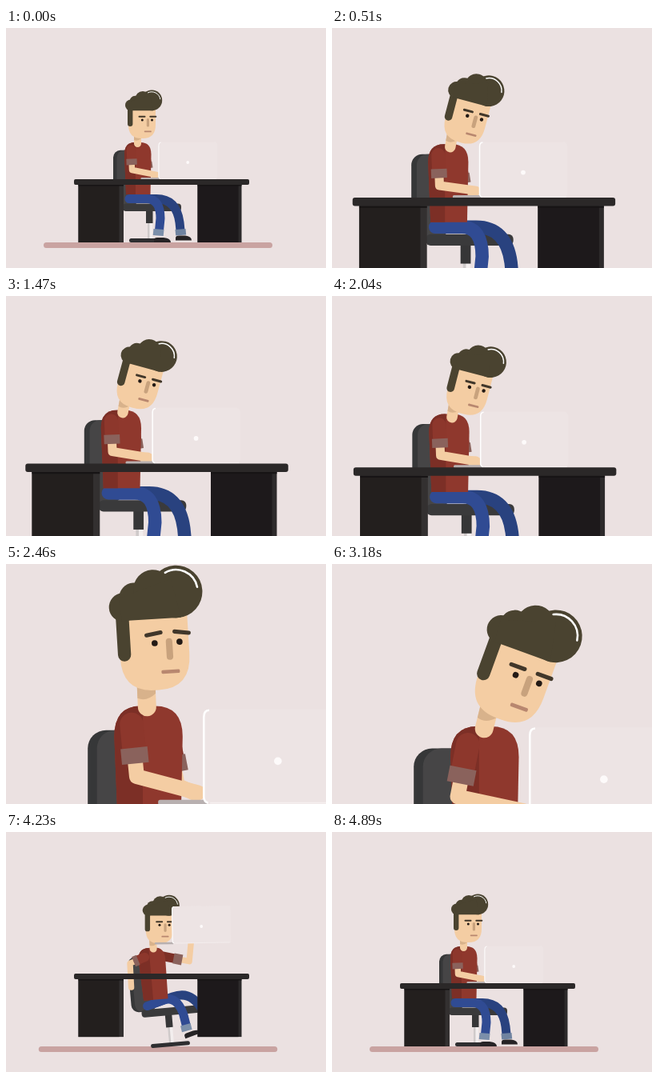
An HTML page for the animation above (4.92 s loop, 400x300 px).

```html
<!DOCTYPE html>
<html lang="en">
<head>
<meta charset="utf-8">
<title>Desk worker</title>
<style>
html, body { margin: 0; width: 100%; height: 100%; overflow: hidden; background: #ebe1e1; }
svg { display: block; width: 100vw; height: 100vh; }
</style>
</head>
<body>
<svg viewBox="0 0 400 300">
  <rect width="400" height="300" fill="#ebe1e1"/>
  <g id="world">
    <rect id="ground" y="268" height="7" rx="3.5" fill="#c9a3a1"/>
    <g id="man">
      <g id="chair">
        <rect x="177" y="242" width="6" height="22" fill="#f3eeee"/>
        <rect x="177" y="242" width="2.5" height="22" fill="#cfcaca"/>
        <rect x="175" y="228" width="8.5" height="16" fill="#363637"/>
        <rect x="154" y="263" width="49" height="5" rx="2.5" fill="#2e2e30"/>
        <rect x="134" y="152.800" width="30" height="69" rx="9" fill="#363738"/>
        <rect x="138.500" y="152.800" width="27" height="69" rx="9" fill="#464546"/>
        <rect x="146" y="219.500" width="73" height="9.500" rx="4" fill="#3a3a3b"/>
      </g>
      <g id="legs" fill="none" stroke-width="11">
        <path d="M212 265.500v-3q0-3 4-3h8q8 1 8 6z" fill="#262325"/>
        <path d="M160 213.500H188Q213 213.500 217 243L218 253" stroke="#29427f"/>
        <path d="M211.500 252l13-1 .7 7.500-13 1z" fill="#6f83a0"/>
        <path d="M185 268v-3q0-3 4-3h8q9 1 9 6z" fill="#262325"/>
        <path d="M154 213.500H176Q193 213.500 193 238L191.500 253" stroke="#304b93" stroke-linecap="round"/>
        <path d="M184.500 251l13 1-.8 8-13-1z" fill="#7b8faa"/>
      </g>
      <g id="torso">
        <g id="farArm"></g>
        <path d="M148 158Q148 143 161 143H168Q181.500 143 181.500 158L180.500 208H150Z" fill="#8f382d"/>
        <path d="M148 158Q148 143 161 143H162V208H150Z" fill="#7c2f26"/>
        <g id="neck">
          <rect x="160" y="128" width="9" height="21" rx="4.500" fill="#f4cda3"/>
          <path d="M160 130h9v8q-4.500 4-9 2z" fill="#d8b28b"/>
        </g>
        <g id="head">
          <path d="M153 96H187V121Q187 138 171 138H169Q153 138 153 121Z" fill="#f4cda3"/>
          <rect x="152" y="96" width="6.400" height="27" rx="3.200" fill="#4a4330"/>
          <g fill="#4a4330">
            <circle cx="182.300" cy="90.400" r="12.900"/>
            <circle cx="156" cy="96.500" r="7"/>
            <circle cx="161.500" cy="92" r="7.200"/>
            <circle cx="171" cy="88.500" r="9.500"/>
            <path d="M154 92L180 84 184 103.200 155 103.200Z"/>
          </g>
          <path d="M177.500 80.800A10.600 10.600 0 0 1 192.800 88.800" fill="none" stroke="#fff" stroke-width="1" stroke-linecap="round"/>
          <g fill="#231a15">
            <circle cx="170.300" cy="115" r="1.500"/>
            <circle cx="182.500" cy="115" r="1.500"/>
          </g>
          <g fill="#41372a">
            <rect id="browL" x="165.500" y="109.800" width="9" height="2" rx="1"/>
            <rect id="browR" x="179.300" y="109.800" width="9" height="2" rx="1"/>
          </g>
          <rect x="175.800" y="113" width="3.200" height="10.600" rx="1.600" fill="#c8a27d"/>
          <rect x="172.800" y="128.400" width="9" height="1.800" rx=".6" fill="#b8876f"/>
        </g>
        <g id="nearArm"></g>
      </g>
    </g>
    <g id="laptop">
      <rect x="168.500" y="187" width="24" height="2.500" rx="1" fill="#b8b0b0"/>
      <rect x="190.500" y="142.500" width="73.500" height="46.500" rx="3.500" fill="#ede4e4"/>
      <path d="M263 188.500H194" stroke="#f6f0f0" stroke-width=".7"/>
      <path d="M193.500 143Q190.900 143 190.900 146.500V185.500Q190.900 188 193 188.500" fill="none" stroke="#fff" stroke-width="1"/>
      <circle cx="227.200" cy="168" r="1.900" fill="#fdfafa"/>
    </g>
    <g id="desk">
      <rect x="90.500" y="194" width="56.500" height="74" fill="#333030"/>
      <rect x="90.500" y="194" width="51" height="74" fill="#231f1e"/>
      <rect x="239.500" y="194" width="55" height="74" fill="#2d2a2b"/>
      <rect x="239.500" y="194" width="51" height="74" fill="#1d191b"/>
      <path d="M90.500 196h56.500v1.500h-56.500zM239.500 196h55v1.500h-55z" fill="#171415"/>
      <rect x="85" y="189" width="219" height="7" rx="2" fill="#2b2828"/>
    </g>
  </g>
</svg>
<script>
const LOOP = 4920;
const $ = id => document.getElementById(id);
const put = (id, tf) => $(id).setAttribute('transform', tf);
const clamp = u => Math.max(0, Math.min(1, u));
const span = (t, a, b) => clamp((t - a) / (b - a));
const mix = (a, b, p) => a + (b - a) * p;
const mixAll = (a, b, p) => a.map((v, i) => mix(v, b[i], p));
const inOut = u => u < .5 ? 4 * u ** 3 : 1 - (2 - 2 * u) ** 3 / 2;
const backOut = u => 1 + 2.70158 * (u - 1) ** 3 + 1.70158 * (u - 1) ** 2;
const expoOut = u => u >= 1 ? 1 : 1 - 2 ** (-10 * u);

// body x, body y, head x, head y, head tilt, worry
const REST = [0, 0, 0, 0, 0, 0];
const WORK = [0, 1.5, 2.2, 1.2, 14.8, 0];
const SIT_UP = [-1, -2, -.6, -2.5, -3.5, 1];
const BOW = [4, -1, -.6, -1, 20, 0];
// shoulder, elbow, hand as x, y pairs
const NEAR = [[156.5, 152, 157.5, 177.5, 188, 183.5], [156, 154, 137, 160, 136, 190]];
const FAR = [[174, 156, 178, 182, 187, 184], [176, 154, 211, 164, 215, 142]];

function stroke(d, color, width, cap) {
  return `<path d="${d}" fill="none" stroke="${color}" stroke-width="${width}" stroke-linecap="${cap}" stroke-linejoin="round"/>`;
}

function drawArm(id, pts, sleeve) {
  const [sx, sy, ex, ey, hx, hy] = pts;
  const on = k => `${mix(sx, ex, k)} ${mix(sy, ey, k)}`;
  $(id).innerHTML =
    stroke(`M${on(.6)}L${ex} ${ey}L${hx} ${hy}`, '#f4cda3', 7.4, 'round') +
    stroke(`M${sx} ${sy}L${on(.45)}`, sleeve, 11.6, 'round') +
    stroke(`M${on(.45)}L${on(.75)}`, '#8a625c', 13.2, 'butt');
}

// slow sway shared by the camera and the head
const sway = t => Math.sin((t - 960) / 900 * 2 * Math.PI - .42);
const typing = t => span(t, 400, 600) * (1 - span(t, 2050, 2250));

function camera(t) {
  if (t >= 3960) return [1, 0, 0];
  const w = sway(t);
  const desk = [1.5, -103.2 + 3.4 * w, -74 + 6.4 * w];
  const face = [2.55, -239.5, -182];
  const c = mixAll(mixAll([1, 0, 0], desk, inOut(span(t, 0, 540))), face, inOut(span(t, 2040, 2430)));
  if (t > 2940) c[2] += 22.5 * ((t - 2940) / 240) ** 3;
  return c;
}

function pose(t) {
  if (t >= 3960) return REST;
  let p = mixAll(REST, WORK, inOut(span(t, 30, 540)));
  const bob = typing(t);
  p[2] += bob * 2.2 * sway(t);
  p[3] += bob * 2.6 * sway(t);
  p[4] += bob * .6 * Math.sin(t / 170);
  p = mixAll(p, SIT_UP, inOut(span(t, 2080, 2430)));
  return mixAll(p, BOW, inOut(span(t, 2800, 3180)));
}

function draw(t) {
  const [s, cx, cy] = camera(t);
  const enter = t >= 3960;
  $('world').style.display = t >= 3480 && !enter ? 'none' : '';
  put('world', `translate(${cx} ${cy}) scale(${s})`);

  const half = 143 * (enter ? Math.max(0, backOut(span(t, 3970, 4595))) : 1);
  $('ground').setAttribute('x', 190 - half);
  $('ground').setAttribute('width', 2 * half);
  put('desk', `translate(0 ${enter ? -275 * (1 - expoOut(span(t, 3950, 4570))) : 0})`);

  const slide = enter ? -270 * (1 - backOut(span(t, 3950, 4430))) : 0;
  const lean = enter ? 1 - inOut(span(t, 4230, 4560)) : 0;
  put('man', `translate(${slide} 0) rotate(${-5 * lean} 180 265)`);
  put('legs', `rotate(${-15 * lean} 160 215)`);
  put('laptop', `translate(${slide - 10 * lean} ${-50 * lean}) rotate(${-lean} 228 166)`);

  const [bx, by, hx, hy, tilt, worry] = pose(t);
  const turn = tilt + 5 * lean;
  const nod = hx + 5 * lean;
  put('torso', `translate(${bx} ${by})`);
  put('neck', `translate(${nod * .6} ${hy * .4}) rotate(${turn * .7} 164.5 146)`);
  put('head', `translate(${nod} ${hy}) rotate(${turn} 164.5 146)`);
  put('browL', `translate(0 ${-worry * .4}) rotate(${-8 * worry} 170 110.8)`);
  put('browR', `translate(0 ${-worry * .4}) rotate(${9 * worry} 183.8 110.8)`);

  const tap = typing(t) * Math.sin(t / 45) * .6;
  const near = mixAll(...NEAR, lean), far = mixAll(...FAR, lean);
  // hands stay by the keyboard while the body shifts
  near[2] -= bx * 1.5;
  near[4] -= bx;
  near[5] += tap - by;
  far[2] -= bx;
  far[4] -= bx;
  far[5] -= tap + by;
  drawArm('nearArm', near, '#8d372c');
  drawArm('farArm', far, '#7c2f26');
}

const start = performance.now();
function tick(now) {
  draw(Math.max(0, now - start) % LOOP);
  requestAnimationFrame(tick);
}
draw(0);
requestAnimationFrame(tick);
</script>
</body>
</html>
```
